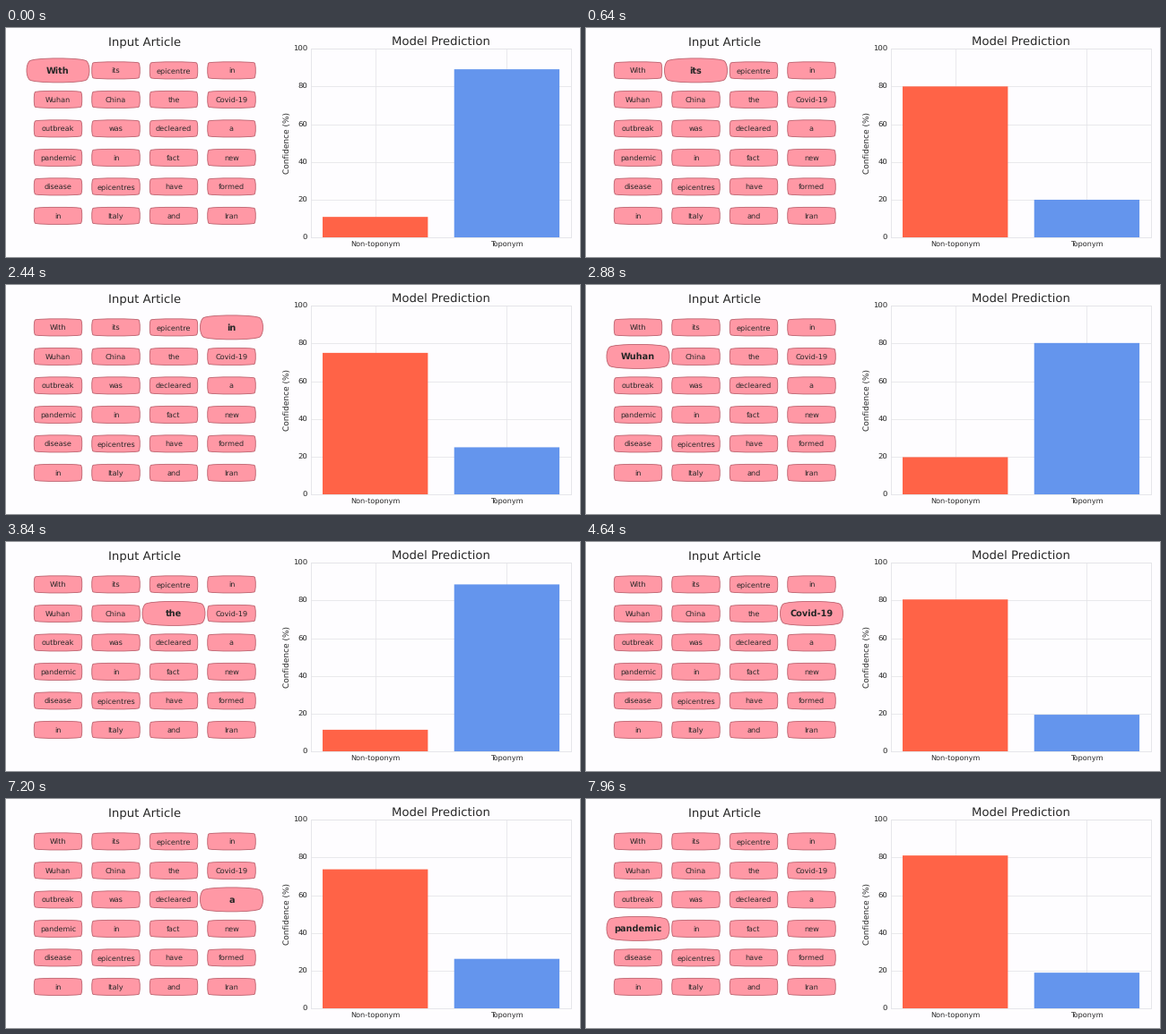
A matplotlib script for the animation above (8000 ms loop, 640 px wide and 256 px high).

```python
import matplotlib.pyplot as plt
from matplotlib.animation import FuncAnimation
from matplotlib.patches import FancyBboxPatch

W, H, DPI = 640, 256, 80
FRAMES, INTERVAL = 200, 40
STEP, MOVE = 16, 12          # frames per word, frames the bars travel
PT = 72 / DPI                # points per pixel

WORDS = ("With its epicentre in Wuhan China the Covid-19 outbreak was decleared a "
         "pandemic in fact new disease epicentres have formed in Italy and Iran").split()
# Non-toponym confidence: value before the first word, then one per word
SCORES = [4, 80, 80, 63.6, 75, 7.5, 4.5, 81.7, 79.1, 78.1, 75.2, 72, 76.7, 83.5]

BG, INK, GRID = "#fefdff", "#262626", "#e4e4e8"
PINK, EDGE = "#ff98a5", "#b85a67"

plt.rcParams["font.family"] = "DejaVu Sans"
plt.rcParams["text.color"] = INK
plt.rcParams["text.hinting"] = "none"
fig = plt.figure(figsize=(W / DPI, H / DPI), dpi=DPI, facecolor=BG)

# Word grid, in pixel coordinates
page = fig.add_axes([0, 0, 1, 1])
page.set_xlim(0, W)
page.set_ylim(H, 0)
page.axis("off")


def word_box(x, y, word, half_w, half_h, bulge, size, weight):
    a, b = half_w + bulge / 4, half_h + bulge / 4
    box = FancyBboxPatch((x - a, y - b), 2 * a, 2 * b,
                         boxstyle=f"round4,pad=0,rounding_size={bulge}",
                         fc=PINK, ec=EDGE, lw=0.8 * PT)
    page.add_patch(box)
    label = page.text(x, y + 0.35 * size, word, size=size * PT, weight=weight,
                      ha="center", va="baseline")
    return box, label


def show(parts, on):
    for part in parts:
        part.set_visible(on)


small, large = [], []
for k, word in enumerate(WORDS):
    x, y = 58 + 64.5 * (k % 4), 47.4 + 32.5 * (k // 4)
    small.append(word_box(x, y, word, 26.8, 9.6, 1.7, 8.1, "normal"))
    large.append(word_box(x, y, word, 35, 13.5, 4.2, 9.75, "bold"))

# Bar chart
left, right, top, bottom = 339.8, 630.3, 23.1, 234.2
ax = fig.add_axes([left / W, 1 - bottom / H, (right - left) / W, (bottom - top) / H],
                  facecolor=BG)
bars = ax.bar(["Non-toponym", "Toponym"], [50, 50], snap=False,
              color=["tomato", "cornflowerblue"])
ax.set_ylim(0, 100)
ax.set_xlim(-0.49, 1.49)
ax.set_axisbelow(True)
ax.grid(color=GRID, lw=0.8 * PT)
ax.tick_params(length=0, labelsize=8.15 * PT, labelcolor=INK, pad=3.5)
ax.tick_params(axis="y", labelsize=8.5 * PT)
for spine in ax.spines.values():
    spine.set(color=GRID, linewidth=0.9 * PT)

page.text(155, 20.2, "Input Article", size=13.3 * PT, ha="center")
fig.text(485.2 / W, 1 - 20.2 / H, "Model Prediction", size=13.3 * PT, ha="center")
fig.text(314.8 / W, 1 - 128.5 / H, "Confidence (%)", size=9 * PT, rotation=90,
         ha="center", va="center")


def update(frame):
    tick = frame + 1 - (frame >= 175)    # one held frame late in the loop
    current, i = divmod(tick, STEP)
    for k in range(len(WORDS)):
        show(small[k], k != current)
        show(large[k], k == current)
    t = min(i / (MOVE - 1), 1)
    before, after = SCORES[current], SCORES[current + 1]
    score = before + (after - before) * t
    bars[0].set_height(score)
    bars[1].set_height(100 - score)
    return list(bars)


anim = FuncAnimation(fig, update, frames=FRAMES, interval=INTERVAL,
                     init_func=lambda: update(0), repeat=True, repeat_delay=0)
plt.show()
```
